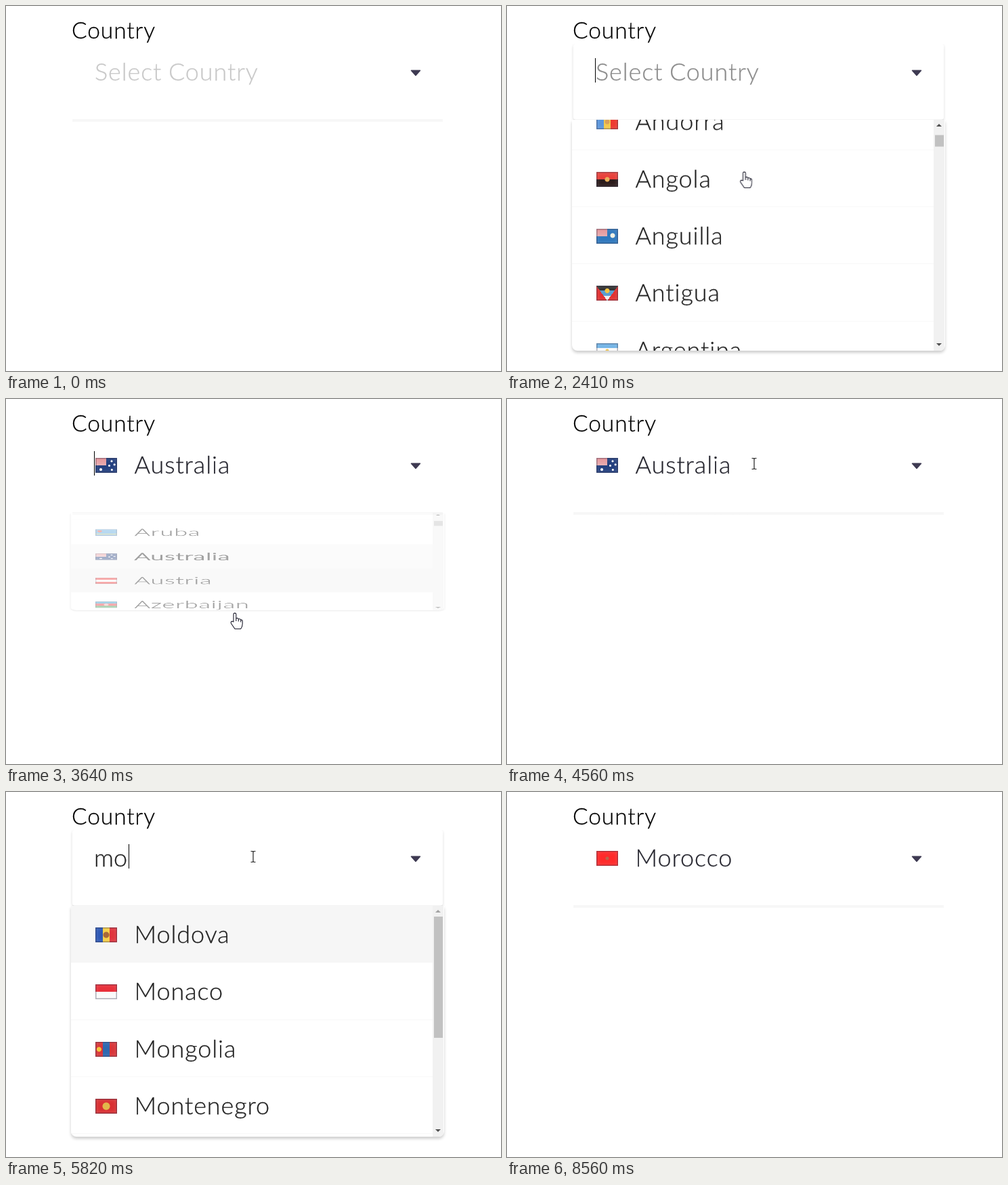
These frames come from a looping animation (731 by 539 pixels, 8.63 s). An HTML page:

```html
<!DOCTYPE html>
<html lang="en">
<head>
<meta charset="utf-8">
<title>Country select</title>
<style>
html, body { margin: 0; width: 100%; height: 100%; overflow: hidden; background: #fff; }
body { position: relative; font: 300 36px/44px Lato, "Open Sans", sans-serif; color: #222; white-space: nowrap;
  letter-spacing: .9px; word-spacing: -1px; font-variant-ligatures: none; -webkit-text-stroke-width: .3px; }
body > *, .value *, #menu > *, .bar *, #cursor * { position: absolute; }
#label { left: 97px; top: 15px; font-size: 33.5px; line-height: 40px; color: #000; }
#line { left: 98px; top: 167px; width: 547px; height: 4px; background: #f7f7f7; }
#field { left: 98px; top: 56px; width: 547px; height: 112px; border-radius: 4px; opacity: 0;
  box-shadow: 0 2px 4px rgba(0, 0, 0, .14); clip-path: inset(0 -6px 0 -6px); }
#hint { left: 131px; top: 74px; color: #c8c8c8; }
.value { left: 132px; top: 74px; opacity: 0; color: #25252e; }
.value .flag { left: 0; top: 13px; }
.value span { left: 57.5px; top: 0; }
.typed { left: 130px; top: 74px; letter-spacing: 0; opacity: 0; }
#caret { left: 0; top: 77px; width: 1px; height: 36px; background: #000; opacity: 0; }
#arrow { left: 597px; top: 94px; }
#menu { left: 96px; top: 168px; width: 551px; height: 341px; overflow: hidden; opacity: 0;
  background: #fff; border-radius: 2px 2px 8px 8px; transform-origin: top;
  box-shadow: 0 3px 4px rgba(0, 0, 0, .2); }
.list { left: 0; top: 0; width: 534px; }
#mor { width: 551px; }
#m, #mo, #mor { opacity: 0; background: #fff; }
.row { position: relative; box-sizing: border-box; height: 84.3px; padding-left: 93.5px;
  line-height: 82px; border-bottom: 1px solid #f8f8f8; }
.row .flag { position: absolute; left: 36px; top: 32px; }
.lit { background: #f6f6f6; border-color: #f6f6f6; }
.bold { -webkit-text-stroke-width: 1.2px; color: #111; }
.flag { width: 32px; height: 22px; box-shadow: inset 0 0 0 1.5px rgba(0, 0, 30, .3), inset 0 0 7px rgba(255, 255, 255, .25); }
.bar { left: 534px; top: 0; width: 16px; height: 341px; background: #f1f1f1; }
#thumb { left: 2px; top: 16px; width: 13px; height: 17px; background: #c1c1c1; }
.tip { left: 4px; border: 4px solid transparent; }
#up { top: 2px; border-bottom-color: #a3a3a3; }
#down { bottom: 3px; border-top-color: #505050; }
#cursor { left: 0; top: 0; opacity: 0; }
#cursor svg { left: 0; top: 0; width: 1px; height: 1px; overflow: visible; opacity: 0; }
#ring { left: -14px; top: -13px; width: 24px; height: 24px; border-radius: 50%; background: rgba(255, 255, 0, .47); opacity: 0; }
</style>
</head>
<body>
<div id="label">Country</div>
<div id="line"></div>
<div id="field"></div>
<div id="hint">Select Country</div>
<div class="value" id="first"></div>
<div class="value" id="second"></div>
<div class="typed" id="t1">m</div>
<div class="typed" id="t2">mo</div>
<div class="typed" id="t3">mor</div>
<div id="caret"></div>
<svg id="arrow" width="16" height="10"><path d="M1.5 1.2h13L8 8.4z" fill="#3e3a52" stroke="#3e3a52" stroke-width="1.5" stroke-linejoin="round"/></svg>
<div id="menu">
  <div class="list" id="all"></div>
  <div class="list" id="m"></div>
  <div class="list" id="mo"></div>
  <div class="bar"><i class="tip" id="up"></i><i id="thumb"></i><i class="tip" id="down"></i></div>
  <div class="list" id="mor"></div>
</div>
<div id="cursor">
  <i id="ring"></i>
  <svg id="pointer"><path d="M0 0V17L4 13.3L6.6 19L9 18L6.5 12.3H12Z" fill="#fff" stroke="#000"/></svg>
  <svg id="beam"><path d="M-3.5-7.5h2.5l1 1 1-1h2.5M0-6.5V7.5M-3.5 8.5h2.5l1-1 1 1h2.5" fill="none" stroke="#222" stroke-width="1.2"/></svg>
  <svg id="hand"><path d="M-2 13V2a1.9 1.9 0 0 1 3.8 0V8q3-1 3.5 1 3-.8 3.4 1.2 2.5-.5 2.5 2V16q0 4-2.5 7.5H0L-5.5 15.5q-1-3 1.5-3.2zM1.8 8v4M5.3 9v3.5M8.7 10.5v3" fill="#fff" stroke="#1b1b2b" stroke-width="1.1" stroke-linejoin="round"/></svg>
</div>
<script>
const LOOP = 8630, ROW = 84.3;
const $ = id => document.getElementById(id);

// Flag layers
const bands = (angle, ...colors) => `linear-gradient(${angle}deg, ${colors.map((c, i) =>
  `${c} ${i / colors.length * 100}% ${(i + 1) / colors.length * 100}%`)})`;
const dot = (c, x = 50, y = 50, r = 4) => `radial-gradient(circle at ${x}% ${y}%, ${c} ${r}px, transparent ${r + 1}px)`;
const wedge = (c, from = 235, x = 45, y = 50) => `conic-gradient(from ${from}deg at ${x}% ${y}%, ${c} 70deg, transparent 0)`;
const strip = (angle, c, a, b) => `linear-gradient(${angle}deg, transparent ${a}%, ${c} ${a}% ${b}%, transparent ${b}%)`;
const jack = 'linear-gradient(#e58d92, #e8b0b4) 0 0 / 50% 50% no-repeat';

const flags = {
  'Afghanistan': [dot('#f3b5a5'), bands(90, '#303030', '#e8352e', '#2ba52f')],
  'Aland Islands': [strip(180, '#e2524a', 43, 57), strip(90, '#e2524a', 34, 44), strip(180, '#f0c060', 34, 66), strip(90, '#f0c060', 28, 50), bands(0, '#3f8fc8')],
  'Albania': [dot('#59201c', 50, 50, 5), bands(0, '#e8352a')],
  'Algeria': [dot('#e0525a'), bands(90, '#2f9450', '#f0f0f0')],
  'American Samoa': [wedge('#f2e6e6', 55, 15), bands(0, '#253a80')],
  'Andorra': [dot('#d9a05a', 50, 50, 3), bands(90, '#5b96dc', '#f2c94c', '#ee3a30')],
  'Angola': [dot('#e8b05a', 50, 50, 3), bands(180, '#e8403a', '#2a1a1a')],
  'Anguilla': [dot('#f1f1e4', 75, 45, 3), jack, bands(0, '#2f78bd')],
  'Antigua': [strip(54, '#e23030', 0, 33), strip(-54, '#e23030', 0, 33), dot('#f4c542', 50, 34, 3), bands(180, '#333', '#5a9ed0', '#f0f0f0')],
  'Argentina': [dot('#efc75a', 50, 50, 2), bands(180, '#73b4e6', '#fafafa', '#73b4e6')],
  'Armenia': [bands(180, '#e23b35', '#3b5fb5', '#f0a53a')],
  'Aruba': [dot('#e0524a', 20, 30, 3), strip(180, '#f2d74e', 68, 78), bands(0, '#57a5dc')],
  'Australia': [dot('#fff', 25, 78, 1.5), dot('#fff', 75, 22, 1), dot('#fff', 88, 45, 1), dot('#fff', 64, 52, 1), dot('#fff', 76, 80, 1), jack, bands(0, '#24407f')],
  'Austria': [bands(180, '#ee3030', '#fafafa', '#ee3030')],
  'Azerbaijan': [dot('#f2b6b0', 50, 50, 3), bands(180, '#2f9bcc', '#e6343c', '#35a050')],
  'Bahamas': [wedge('#222'), bands(180, '#2fb0c8', '#f2b93a', '#2fb0c8')],
  'Macau': [dot('#e8f2e0'), bands(0, '#1d8a62')],
  'Macedonia': [dot('#f5cf3a', 50, 50, 5), bands(0, '#e0322f')],
  'Madagascar': [bands(180, '#e8403a', '#2f9a50')],
  'Malawi': [bands(180, '#2a2a2a', '#e23434', '#2f9448')],
  'Moldova': [dot('#a8683a'), bands(90, '#2d58b5', '#f6cf48', '#e0343c')],
  'Monaco': [bands(180, '#e8303a', '#fafafa')],
  'Mongolia': [dot('#f2c53a', 17, 50, 3), bands(90, '#d93438', '#2f68b0', '#d93438')],
  'Montenegro': [dot('#e2b64a', 50, 50, 5), bands(0, '#d92f32')],
  'Morocco': [dot('#b8664a', 50, 50, 2), bands(0, '#ff2a2a')]
};
const names = Object.keys(flags);
const flag = name => `<div class="flag" style="background:${flags[name].join()}"></div>`;
const rows = (id, list) => $(id).innerHTML = list.map(name => `<div class="row">${flag(name)}${name}</div>`).join('');
const value = (id, name) => $(id).innerHTML = `${flag(name)}<span>${name}</span>`;

rows('all', names.slice(0, 16));
rows('m', names.slice(16, 20));
rows('mo', names.slice(20, 24));
rows('mor', ['Morocco']);
value('first', 'Australia');
value('second', 'Morocco');
for (const id of ['all', 'm', 'mo', 'mor']) $(id).firstChild.classList.add('lit');
$('mor').firstChild.classList.add('bold');
$('all').children[12].id = 'pick';
$('all').children[13].id = 'next';

// Keyframe builder: stops are [ms, declarations, easing]
let css = '';
const anims = {};
function track(id, stops) {
  const name = `${id}-${(anims[id] ||= []).length}`;
  css += `@keyframes ${name}{${stops.map(([ms, rule, ease = 'step-end']) =>
    `${ms / LOOP * 100}%{${rule};animation-timing-function:${ease}}`).join('')}}`;
  anims[id].push(`${name} ${LOOP}ms step-end infinite`);
}
const show = (id, ...spans) => track(id, [[0, 'opacity:0'],
  ...spans.flatMap(([from, to]) => [[from, 'opacity:1'], [to, 'opacity:0']])]);

// Field
track('hint', [[0, 'color:#c8c8c8'], [1220, 'color:#8c8c8c']]);
track('hint', [[0, 'opacity:1'], [3560, 'opacity:0'], [LOOP, 'opacity:0']]);
track('first', [[0, 'opacity:0'], [3560, 'opacity:1'], [4560, 'opacity:1', 'linear'], [4700, 'opacity:.5'], [5670, 'opacity:0']]);
track('second', [[0, 'opacity:0'], [7000, 'opacity:.85', 'linear'], [7140, 'opacity:1'], [LOOP, 'opacity:1']]);
show('t1', [5670, 5820]);
show('t2', [5820, 6280]);
show('t3', [6280, 7000]);
show('caret', [1220, 1750], [2280, 2810], [3340, 3870], [4670, 5200], [5670, 6830], [7000, 7540], [8070, 8560]);
track('caret', [[0, 130], [5670, 160], [5820, 181], [6280, 192], [7000, 130]].map(([ms, x]) => [ms, `left:${x}px`]));
track('field', [[0, 'opacity:0'], [1340, 'opacity:0', 'linear'], [1460, 'opacity:1'], [3520, 'opacity:1', 'linear'],
  [3640, 'opacity:.05', 'linear'], [3720, 'opacity:0'], [4560, 'opacity:0', 'linear'], [4700, 'opacity:1'],
  [7000, 'opacity:1', 'linear'], [7150, 'opacity:0']]);

// Menu
const fold = (ms, k, ease) => [ms, `opacity:${k};transform:scaleY(${k})`, ease];
track('menu', [fold(0, 0), fold(1340, 0, 'linear'), fold(1460, 1), fold(3530, 1, 'linear'), fold(3640, .427, 'linear'),
  fold(3720, 0), fold(4560, 0, 'linear'), fold(4700, 1), fold(7010, 1, 'linear'), fold(7150, 0)]);
track('menu', [[0, 'height:341px'], [6280, 'height:83px']]);
const scroll = [[0, 0], [2110, 0, 'linear'], [2410, 460, 'ease-out'], [2480, 500], [2720, 500, 'ease-in-out'],
  [2950, 700, 'ease-in-out'], [3220, 901], [4500, 12 * ROW], [5670, 0]];
track('all', scroll.map(([ms, y, ease]) => [ms, `transform:translateY(${-y}px)`, ease]));
track('thumb', scroll.map(([ms, y, ease]) => [ms, `transform:translateY(${y / 70}px)`, ease]));
track('thumb', [[0, 'height:17px'], [5670, 'height:57px'], [5820, 'height:179px'], [8000, 'height:17px']]);
track('up', [[0, 'border-bottom-color:#a3a3a3'], [2110, 'border-bottom-color:#505050'], [5670, 'border-bottom-color:#a3a3a3']]);
track('pick', [[0, 'background:#fff'], [3340, 'background:#f6f6f6'], [5670, 'background:#fff']]);
track('pick', [[0, '-webkit-text-stroke-width:.3px'], [3560, '-webkit-text-stroke-width:1.2px'], [5670, '-webkit-text-stroke-width:.3px']]);
track('next', [[0, 'background:#fff'], [3560, 'background:#f1f1f1'], [4300, 'background:#fff']]);
show('m', [5670, 5820]);
show('mo', [5820, 6280]);
show('mor', [6280, 7400]);

// Cursor
const at = (ms, x, y, ease) => [ms, `transform:translate(${x}px,${y}px)`, ease];
track('cursor', [at(0, 610, 457), at(310, 610, 457, 'ease-out'), at(840, 371, 107), at(1650, 371, 107, 'linear'),
  at(1800, 371, 128, 'ease-out'), at(2080, 350.5, 245), at(2410, 350.5, 245, 'linear'), at(2570, 347, 228),
  at(3220, 347, 228, 'ease-in-out'), at(3460, 338, 316), at(3640, 338, 316, 'ease-in-out'), at(4180, 365, 95),
  at(7720, 365, 95, 'ease-in'), at(8090, 617, 514)]);
show('cursor', [310, 8160]);
show('pointer', [310, 690], [3720, 3980], [7860, 8160]);
show('beam', [690, 1890], [3980, 7860]);
show('hand', [1890, 3720]);
show('ring', [980, 1070], [3460, 3560], [4340, 4410]);

for (const id in anims) css += `#${id}{animation:${anims[id].join()}}`;
document.head.appendChild(document.createElement('style')).textContent = css;
</script>
</body>
</html>
```
